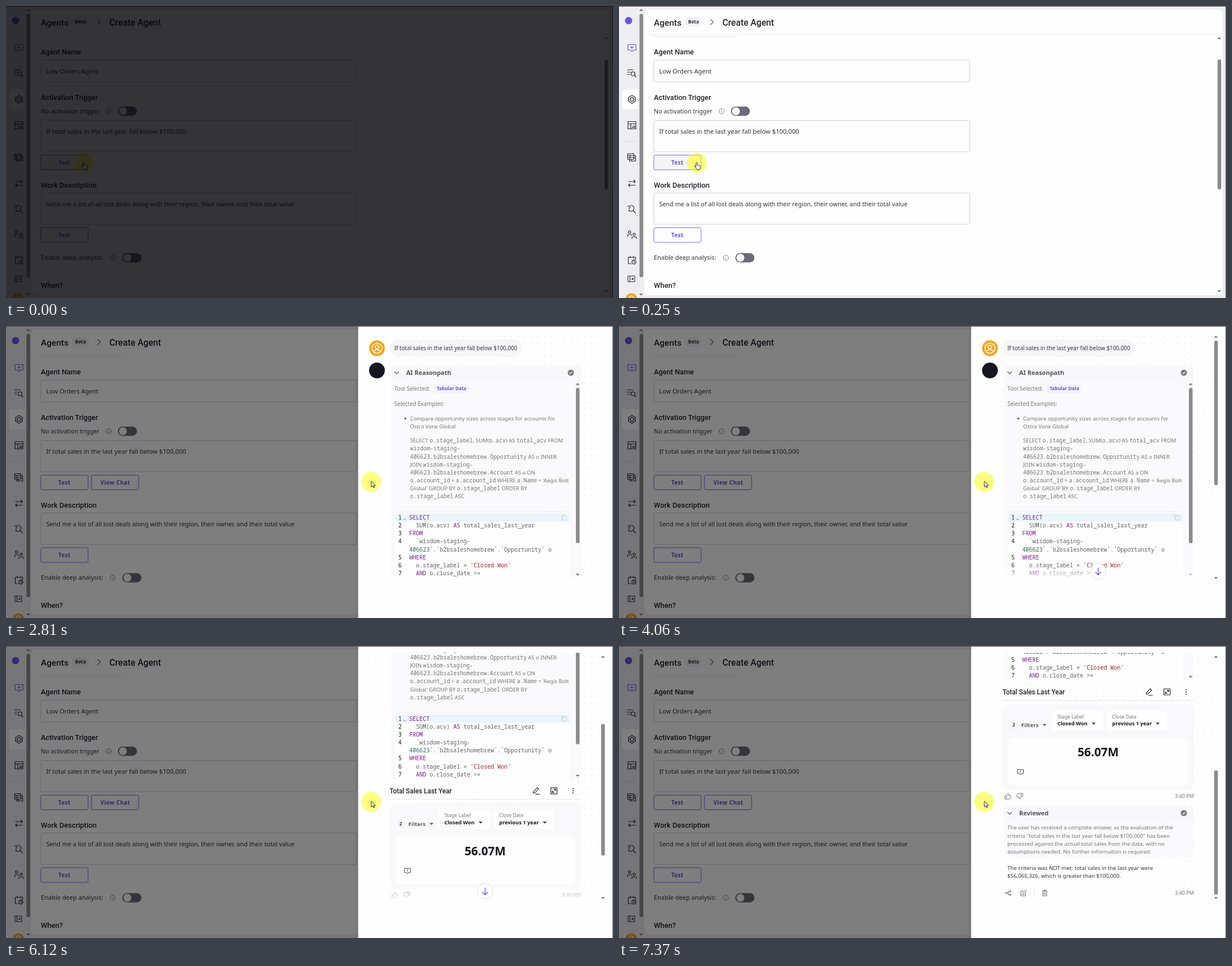
Animation of 1080 by 519 pixels, one loop 8 s. Source, as an HTML page:

```html
<!DOCTYPE html>
<html lang="en">
<head>
<meta charset="utf-8">
<title>Create Agent</title>
<style>
html, body { margin: 0; width: 100%; height: 100%; overflow: hidden; background: #ededf2; }
svg { display: block; width: 100vw; height: 100vh; }
text { font-family: "Noto Sans", sans-serif; white-space: pre; fill: #33333d; }
.head { font-family: Roboto, sans-serif; font-weight: 500; fill: #23232d; }
.semi { font-weight: 600; }
.btn { font-weight: 600; letter-spacing: .35px; fill: #6553d3; }
.mono { font-family: "Noto Sans Mono", monospace; }
.grey { fill: #75757c; }
.code { font-family: "Noto Sans Mono", monospace; fill: #606067; }
.kw { fill: #7b1a8c; }
.str { fill: #a02020; }
.num { fill: #2e6b58; }
.dark { fill: #17171f; }
</style>
</head>
<body>
<svg id="stage" viewBox="0 0 1080 519" preserveAspectRatio="none"></svg>
<script>
const LOOP = 8000, INK = '#2b2b38', PURPLE = '#6a58d8', BAR = '#8b8b8b';

// ---- drawing helpers ----
const text = (x, y, s, size, cls = '', extra = '') =>
  `<text x="${x}" y="${(y + size * .36).toFixed(2)}" font-size="${size}" class="${cls}" ${extra}>${s}</text>`;
const rect = (x, y, x2, y2, fill, rx = 0, extra = '') =>
  `<rect x="${x}" y="${y}" width="${x2 - x}" height="${y2 - y}" rx="${rx}" fill="${fill}" ${extra}/>`;
const circle = (x, y, r, fill, extra = '') =>
  `<circle cx="${x}" cy="${y}" r="${r}" fill="${fill}" ${extra}/>`;
const line = (x, y, x2, y2, color) =>
  `<path d="M${x} ${y}L${x2} ${y2}" stroke="${color}"/>`;
const icon = (x, y, d, color = INK, width = 1.2) =>
  `<path transform="translate(${x} ${y})" d="${d}" fill="none" stroke="${color}" stroke-width="${width}" stroke-linecap="round" stroke-linejoin="round"/>`;
const tri = (x, y, dir, color = '#77777c', w = 3.5) =>
  `<path d="M${x - w} ${y - dir * w / 2}h${2 * w}l${-w} ${dir * w}z" fill="${color}"/>`;
const ring = r => `M${-r} 0a${r} ${r} 0 1 0 ${2 * r} 0a${r} ${r} 0 1 0 ${-2 * r} 0`;
const outlined = (x, y, x2, y2, stroke, id = '') =>
  rect(x, y, x2, y2, '#fefefe', 2.5, `stroke="${stroke}" ${id}`);
const button = (x, y, label, tx, id = '') =>
  outlined(x, y, x + 84, y + 26, '#7a6ae0', id) + text(tx, y + 13, label, 10, 'btn');
const info = (x, y) => icon(x, y, ring(4.6) + 'M0 -.3v2.4M0 -2.2v.1', '#77777f', .9);
const toggle = (x, y) => rect(x, y - 8.3, x + 34, y + 8.3, '#6d6a79', 8.3) + circle(x + 9, y, 7, '#fff');

// ---- page behind the drawer ----
function sidebar() {
  return circle(17, 26, 6.5, PURPLE) +
    rect(6, 148, 34, 184, '#fff', 3) +
    icon(23, 74, 'M-7-5.5h14v10h-5l-2 2.5-2-2.5h-5zM0-3v5M-2.5-.5h5', PURPLE) +
    icon(22, 119, 'M-7-5.5h10M-7-1.5h5M-7 2.5h4M5.5 4l2.5 3M-.5 1.5a3.5 3.5 0 1 0 7 0a3.5 3.5 0 1 0-7 0') +
    icon(23, 166, 'M0-7l6 3.5v7L0 7l-6-3.5v-7zM0-3.5l3 1.8v3.4L0 3.5l-3-1.8v-3.4z', INK, 1.4) +
    icon(23, 212, 'M-7-6.5h14v13h-14zM-7-2.5h14M-2-2.5v9M1 4.5v-2M3 4.5v-4M5 4.5v-3') +
    line(6, 240.5, 29, 240.5, '#d9d9e0') +
    icon(22.5, 269, 'M-7-6.5h11v10h-11zM-7-3.5h11M-7 0h11M-3-3.5v7M4-3h3v9.5h-11v-3M0 3.5v3M7 1.5h-3') +
    icon(23, 315, 'M-6-3h12M3.5-5.5l2.5 2.5-2.5 2.5M6 3.5h-12M-3.5 1l-2.5 2.5 2.5 2.5') +
    icon(22, 360, 'M-1-6a5.5 5.5 0 1 1-4 9M3.5 4l4 4M-6-3a2 2 0 1 1 2.8 1.8q-.8.4-.8 1.7M-4 2.6v.1') +
    icon(23, 406, 'M-6.5-4.5a2.2 2.2 0 1 0 4.4 0a2.2 2.2 0 1 0-4.4 0M-7.5 4v-2q0-2 2-2h2.5q2 0 2 2M1.8 0a2.2 2.2 0 1 0 4.4 0a2.2 2.2 0 1 0-4.4 0M0 7.5v-1q0-2 2-2h4q2 0 2 2v1') +
    icon(23, 452, 'M-1 6h-5.5v-11.5h13v4M-3-7v3M3-7v3M0 3a3.6 3.6 0 1 0 7.2 0a3.6 3.6 0 1 0-7.2 0M3.6 1.2v2l1.2.8') +
    icon(22, 485, 'M-6-5h12v10h-12zM-2.5-5v10M0 0h3.5M2-1.5l1.5 1.5-1.5 1.5', INK, 1.1) +
    circle(22, 521, 10.5, '#f3a51d') + circle(22, 519, 3.5, 'none', 'stroke="#fff" stroke-width="1.2"') +
    rect(36.5, 14, 43, 482, BAR, 3) + tri(39.5, 7, -1) + tri(39.5, 513, 1);
}

function page() {
  const box = '#cfcfd4';
  return rect(0, 0, 1080, 519, '#ededf2') + rect(45, 6, 1074, 514, '#fefefe', 8) + sidebar() +
    text(62, 29, 'Agents', 15.5, 'head') + rect(117, 20, 147, 36, '#f1f1f5', 8) +
    text(123, 28, 'Beta', 8.4, 'semi') +
    icon(165.5, 28.5, 'M-2.5-4.5l5 4.5-5 4.5', '#66666e') +
    text(184, 29, 'Create Agent', 15.7, 'head') +
    line(45, 50, 1074, 50, '#efeff2') +
    `<path d="M62 50v2q0 2 2 2h143q2 0 2-2v-2" fill="none" stroke="#e8e8ec"/>` +
    text(62, 81.5, 'Agent Name', 12.8, 'head') + outlined(62, 96, 624, 135, box) +
    text(71.5, 116, 'Low Orders Agent', 11) +
    text(62, 162, 'Activation Trigger', 12.8, 'head') +
    text(62, 187, 'No activation trigger', 10.75) + info(182.5, 187) + toggle(199, 187) +
    outlined(62, 203.5, 624, 259, box) +
    text(71.5, 223, 'If total sales in the last year fall below $100,000', 11.25) +
    button(62, 265, 'Test', 93, 'id="test"') +
    `<g id="view">${button(152, 265, 'View Chat', 168)}</g>` +
    text(62, 318, 'Work Description', 12.95, 'head') + outlined(62, 332.5, 624, 388, box) +
    text(71.5, 352, 'Send me a list of all lost deals along with their region, their owner, and their total value', 10.9) +
    button(62, 394, 'Test', 93) +
    text(62, 447.5, 'Enable deep analysis:', 11.05) + info(190, 447.5) + toggle(207, 447.5) +
    text(62, 496, 'When?', 13, 'head') +
    rect(1065, 95, 1071.5, 326, BAR, 3) + tri(1068, 57, -1) + tri(1068, 507, 1);
}

// ---- drawer content, laid out at scroll 0 ----
const sqlLine = s => s.split(/([\w-]*[a-z0-9][._-][\w.-]*)/)
  .map((p, i) => i % 2 ? `<tspan class="mono grey" font-size="9.9">${p}</tspan>` : p).join('');
const paint = s => s.replace(/\b(SELECT|AS|FROM|WHERE|AND)\b|'[^']*'|\b\d+\b/g, m =>
  `<tspan class="${m[0] === "'" ? 'str' : /\d/.test(m) ? 'num' : 'kw'}">${m}</tspan>`);

function codeBlock() {
  const rows = [[1, 'SELECT'], [2, '  SUM(o.acv) AS total_sales_last_year'], [3, 'FROM'],
    [4, '  `wisdom-staging-'], ['', '406623`.`b2bsaleshomebrew`.`Opportunity` o'],
    [5, 'WHERE'], [6, "  o.stage_label = 'Closed Won'"], [7, '  AND o.close_date >=']];
  return rect(692, 330, 1003, 447, '#fefefe') + line(692, 330.5, 1003, 330.5, '#ececf0') +
    rect(692, 333, 1003, 347.5, '#e9f6fb') +
    rows.map(([n, s], i) => text(704, 340.5 + 14.1 * i, n, 10.05, 'code dark', 'text-anchor="end"') +
      text(717.5, 340.5 + 14.1 * i, paint(s), 10.05, 'code')).join('') +
    icon(709.5, 344, 'M-1.8-1l1.8 2 1.8-2', '#66666c', .9) +
    icon(993, 340.5, 'M-2.5-2.5h7v7h-7zM-2.5 2.5h-2v-7h7v2', '#c3d3dc', .9);
}

const header = (y, label) => rect(685, y - 13, 1023, y + 14, '#f8f8fb', 5) +
  icon(695, y, 'M-3.5-1.5l3.5 3.5 3.5-3.5', '#55555c', 1.1) +
  text(712, y, label, 11, 'semi', 'fill-opacity=".85"') +
  circle(1005, y, 5.6, '#7d7d82') + icon(1005, y, 'M-2.3.2l1.6 1.6 3-3.3', '#fff', 1.1);

function reasoning() {
  const sql = ['SELECT o.stage_label, SUM(o.acv) AS total_acv FROM', 'wisdom-staging-',
    '406623.b2bsaleshomebrew.Opportunity AS o INNER', 'JOIN wisdom-staging-',
    '406623.b2bsaleshomebrew.Account AS a ON',
    "o.account_id = a.account_id WHERE a.Name = 'Aegis Bolt",
    "Global' GROUP BY o.stage_label ORDER BY", 'o.stage_label ASC'];
  return rect(685, 70, 1023, 447, '#fafafc', 5, 'fill-opacity=".85"') + header(83, 'AI Reasonpath') +
    text(691, 111.5, 'Tool Selected:', 9.85, 'grey') + rect(761, 103, 823, 119.5, '#f4f3fb', 4) +
    text(766.5, 111.5, 'Tabular Data', 8.2, 'btn', 'style="letter-spacing:0"') +
    text(691, 138.5, 'Selected Examples:', 9.9, 'grey') + circle(710.5, 164.5, 1.7, '#55555c') +
    text(719, 164.5, 'Compare opportunity sizes across stages for accounts for', 9.6, 'grey') +
    text(719, 178.5, 'Ostra Vane Global', 9.6, 'grey') +
    sql.map((s, i) => text(719, 204 + 14.05 * i, sqlLine(s), 9.55, 'grey')).join('') +
    codeBlock() +
    rect(1014, 110, 1020.5, 386, BAR, 3) + tri(1017, 103, -1) + tri(1017, 442, 1);
}

const filter = (x, x2, label, value, caret) => rect(x, 502, x2, 537, '#fefefe', 3) +
  text(x + 10, 512.5, label, 8.65, 'grey') + text(x + 10, 525, value, 9.3, 'dark', 'font-weight="700"') +
  tri(caret, 525, 1, '#33333d');
const THUMB = 'M-5-.5h2.5v5.5h-2.5zM-2.5 0l2.5-5q2 0 1.5 2l-.5 1.5h3.5q1 0 .8 1l-1 4.5q-.3 1-1.3 1h-5.5';

function chart() {
  return text(682.5, 468.5, 'Total Sales Last Year', 11.85, 'head') +
    icon(943, 468.5, 'M-5 4l.8-3 6.5-6.5 2.4 2.4-6.5 6.5zM-1 6h7') +
    icon(975, 468.5, 'M-5.5-5.5h11v11h-11zM0-3h3v3M-3 0v3h3M3-3l-2 2M-3 3l2-2') +
    [-4, 0, 4].map(d => circle(1009, 468.5 + d, 1.1, INK)).join('') +
    line(683, 483.5, 1023, 483.5, '#e4e4e8') +
    rect(683, 490, 1023, 643, '#f9f9fc', 10) +
    rect(696, 519, 710, 535, '#f5f5f9', 4) + text(700, 527.5, '2', 8.3, 'semi') +
    text(716, 527.5, 'Filters', 9, 'semi', 'letter-spacing=".35" fill-opacity=".85"') + tri(757, 527.5, 1, '#55555c') +
    filter(770, 861, 'Stage Label', 'Closed Won', 844.5) +
    filter(867.5, 974, 'Close Date', 'previous 1 year', 958.5) +
    rect(693, 549.5, 1012, 634, '#fefefe', 6) +
    text(852.5, 576, '56.07M', 20.8, 'dark', 'text-anchor="middle" font-weight="700"') +
    icon(714.5, 611, 'M-5-4.5h10v7.5h-3.5l-1.5 2-1.5-2h-3.5zM0-2.5v2.2M0 1.2v.1', '#44444c', 1) +
    icon(692, 654, THUMB, '#77777e', .95) +
    `<g transform="rotate(180 713 654)">${icon(713, 654, THUMB, '#77777e', .95)}</g>` +
    text(989, 654, '3:40 PM', 9.05, 'grey');
}

function review() {
  const notes = ['The user has received a complete answer, as the evaluation of the',
    'criteria "total sales in the last year fall below $100,000" has been',
    'processed against the actual total sales from the data, with no',
    'assumptions needed. No further information is required.'];
  return rect(685, 671, 1023, 764, '#fafafc', 5, 'fill-opacity=".9"') + header(684, 'Reviewed') +
    notes.map((s, i) => text(691, 710 + 14.1 * i, s, 9.6, 'grey')).join('') +
    text(691, 781.5, 'The criteria was NOT met: total sales in the last year were', 9.67) +
    text(691, 795.5, '$56,065,326, which is greater than $100,000.', 9.67) +
    icon(692.5, 826, 'M-5 0a1.3 1.3 0 1 0 2.6 0a1.3 1.3 0 1 0-2.6 0M-2.4 0h2.4v-3h2M0 0v3h2M2.2-3a1.3 1.3 0 1 0 2.6 0a1.3 1.3 0 1 0-2.6 0M2.2 3a1.3 1.3 0 1 0 2.6 0a1.3 1.3 0 1 0-2.6 0', '#66666e', 1) +
    icon(720, 826, 'M-1-3.5h-4v8.5h8.5v-4M-2 2l.3-2 5-5 1.8 1.8-5 5z', '#66666e', 1) +
    line(739.5, 818, 739.5, 834, '#e3e3e8') +
    icon(757.5, 826, 'M-4.5-3.5h9M-1.5-3.5v-1.5h3v1.5M-3.5-3.5v8.5h7v-8.5M-1.2-1v3.5M1.2-1v3.5', '#66666e', 1) +
    text(989, 826, '3:40 PM', 9.05, 'grey');
}

function drawer() {
  const avatar = circle(660, 39.5, 14, '#f9a31a') +
    icon(660, 39.5, ring(9) + 'M-3-2.5a3 3 0 1 0 6 0a3 3 0 1 0-6 0M-6 6.5q1.5-4 6-4t6 4', '#fff', 1.5);
  const arcs = Array.from({ length: 20 }, (_, i) => {
    const pt = a => `${(10.4 * Math.cos(a)).toFixed(2)} ${(10.4 * Math.sin(a)).toFixed(2)}`;
    const a = i * .27;
    return `<path d="M${pt(a)}A10.4 10.4 0 0 1 ${pt(a + .29)}" opacity="${(i + 1) / 20}"/>`;
  }).join('');
  return rect(626.5, 0, 1080, 519, '#fefefe', 0, 'filter="url(#shade)"') +
    `<g id="spin" fill="none" stroke="#6654d6" stroke-width="2">${arcs}</g>` +
    `<g id="chat">
      ${rect(640, 14, 1056, 450, 'url(#dots)', 0, 'mask="url(#dotFade)"')}
      <g clip-path="url(#view-port)"><g id="scroll">
        ${avatar}${rect(683, 24, 918, 54, '#f6f6f9', 15)}
        ${text(691, 39.5, 'If total sales in the last year fall below $100,000', 9.88)}
        ${circle(660, 79, 14, '#15151f')}
        ${reasoning()}<g id="more">${chart()}${review()}</g>
      </g></g>
      <g id="bottom">${rect(640, 425, 1056, 456, 'url(#veil)')}
        ${circle(852.5, 436, 14, '#fff', 'stroke="#e0e0e6"')}
        ${icon(852.5, 436, 'M0-6v12M-4.5 1.8l4.5 4.5 4.5-4.5', PURPLE, 1.4)}</g>
      <g id="bar">${tri(1062, 19, -1)}${tri(1062, 448, 1)}<rect id="thumb" x="1059" width="6.5" rx="3" fill="${BAR}"/></g>
    </g>`;
}

const defs = `<defs>
  <pattern id="dots" x="645" y="18" width="12" height="11.7" patternUnits="userSpaceOnUse"><circle cx="1.2" cy="1.2" r=".8" fill="#dadadf"/></pattern>
  <linearGradient id="diag" x1=".1" y1=".75" x2=".75" y2=".1"><stop offset=".15" stop-color="#000"/><stop offset=".8" stop-color="#fff"/></linearGradient>
  <mask id="dotFade"><rect x="640" y="14" width="420" height="436" fill="url(#diag)"/></mask>
  <linearGradient id="veil" x1="0" y1="0" x2="0" y2="1"><stop offset="0" stop-color="#fefefe" stop-opacity="0"/><stop offset=".75" stop-color="#fefefe" stop-opacity=".8"/><stop offset="1" stop-color="#fefefe"/></linearGradient>
  <clipPath id="view-port"><rect x="640" y="12" width="416" height="443"/></clipPath>
  <filter id="shade" x="-5%" width="110%"><feDropShadow dx="-1" dy="0" stdDeviation="3" flood-opacity=".15"/></filter>
</defs>`;

const cursor = `<g id="cursor">${circle(0, 0, 17.6, '#ff0', 'fill-opacity=".5"')}
  <path id="arrow" d="M.5-1V9.2L2.8 7.2l1.5 3.5 1.7-.7-1.5-3.4h3.2z" fill="#fff" stroke="#111" stroke-width=".9"/>
  <path id="hand" d="M-1.5 7V.5q0-1.3 1.1-1.3t1.1 1.3V4q1.6-.6 2 .3q1.4-.5 1.7.5q1.4-.2 1.4 1.2v2.5q0 3-1.7 3.5h-3.6q-1-.6-2-2.3l-2.3-3.4q-.3-1.2 1-1z" fill="#fff" stroke="#222" stroke-width=".9"/></g>`;

const stage = document.getElementById('stage');
stage.innerHTML = defs + page() + '<rect id="dim" width="1080" height="519"/>' +
  `<g id="drawer">${drawer()}</g>` + cursor +
  line(0, .5, 1080, .5, '#4a4a50') + line(1079.5, 0, 1079.5, 519, '#77777c') +
  '<rect id="dark" width="1080" height="519" fill="#020206"/>';

// ---- motion ----
const el = {};
stage.querySelectorAll('[id]').forEach(n => el[n.id] = n);
const set = (id, name, v) => el[id].setAttribute(name, v);
const show = (id, on) => set(id, 'opacity', +on);
const ramp = (t, start, dur) => Math.min(1, Math.max(0, (t - start) / dur));
const inOut = p => p * p * (3 - 2 * p);
const out = p => 1 - (1 - p) ** 3;

// wheel ticks: start, duration, distance
const TICKS = [[4780, 150, 70.4], [5150, 320, 70.4], [5520, 320, 70.4],
  [6340, 280, 70.4], [6590, 280, 70.4], [6840, 260, 35]];

function render(t) {
  set('dark', 'opacity', .8 * (1 - ramp(t, 40, 200)));
  set('test', 'fill', t < 810 ? '#f5f5f6' : '#fefefe');
  show('view', t >= 1060);

  const slide = out(ramp(t, 1040, 340));
  set('dim', 'opacity', .5 * slide);
  show('drawer', slide > 0);
  set('drawer', 'transform', `translate(${454 * (1 - slide)} 0)`);

  const loaded = ramp(t, 1660, 130);
  set('spin', 'transform', `translate(852.5 233) rotate(${120 + (t - 1430) * .36})`);
  show('spin', loaded === 0);
  set('chat', 'opacity', loaded);

  const more = ramp(t, 3850, 160);
  const y = TICKS.reduce((sum, [at, dur, d]) => sum + d * inOut(ramp(t, at, dur)), 0);
  set('scroll', 'transform', `translate(0 ${-y})`);
  set('more', 'opacity', more);
  set('bar', 'opacity', more);
  set('bottom', 'opacity', more * (1 - ramp(y, 340, 44)));
  const full = 707 + 70 * ramp(t, 5180, 750) + 45 * ramp(t, 6370, 700);
  set('thumb', 'y', 26 + 414 * y / full);
  set('thumb', 'height', 414 * 439 / full);

  const go = inOut(ramp(t, 1850, 450));
  set('cursor', 'transform', `translate(${138.5 + 511 * go} ${278.8 - 2 * go})`);
  show('hand', t < 1060);
  show('arrow', t >= 1060);
}

const begin = performance.now();
function tick() {
  render((performance.now() - begin) % LOOP);
  requestAnimationFrame(tick);
}
tick();
</script>
</body>
</html>
```
